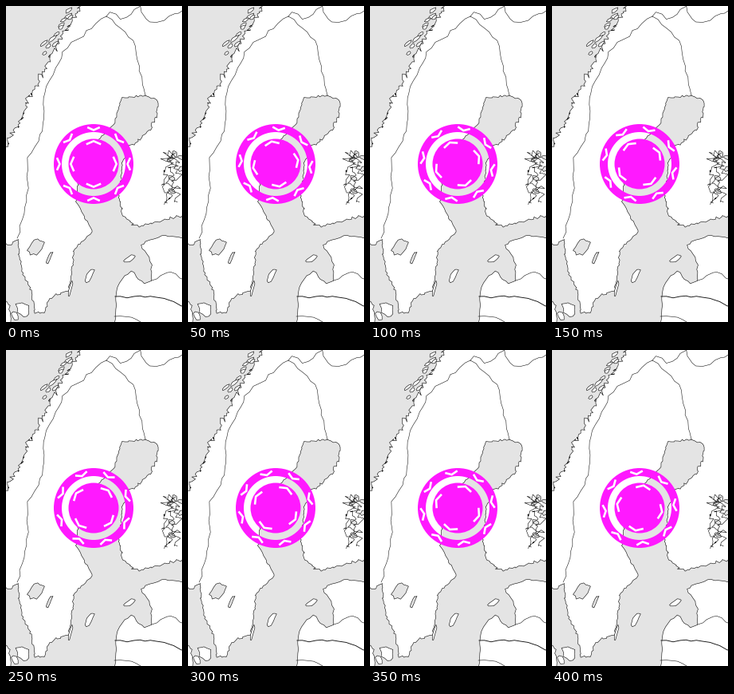
Animation, 221 px wide and 396 px high, one loop 0.45 s. Source, as a matplotlib script:

```python
import numpy as np
import matplotlib.pyplot as plt
from matplotlib.animation import FuncAnimation
from matplotlib.patches import Circle, Wedge

W, H, DPI = 221, 396, 100
FRAMES, STEP = 9, 50
PX = 72 / DPI
SEA, LAND, INK, PINK = "#e4e4e4", "#ffffff", "#101010", "#ff19ff"
CX, CY = 110, 198

rng = np.random.default_rng(7)


def rough(pts, step, amp):
    """Walk along the key points in even steps with a random wobble."""
    p = np.array(pts, float)
    dist = np.r_[0, np.cumsum(np.hypot(*np.diff(p, axis=0).T))]
    t = np.linspace(0, dist[-1], int(dist[-1] / step) + 2)
    walk = np.column_stack([np.interp(t, dist, p[:, k]) for k in (0, 1)])
    walk[1:-1] += rng.normal(0, amp, (len(t) - 2, 2))
    return walk


def stroke(pts, width=0.6):
    ax.plot(*pts.T, color=INK, lw=width * PX, zorder=2)


def border(*pts, width=0.55):
    stroke(rough(pts, 8, 0.9), width)


def land(*coasts):
    ax.fill(*np.vstack(coasts).T, fc=LAND, lw=0, zorder=1)
    for coast in coasts:
        stroke(coast)


def blob(x, y, length, width, tilt, color=LAND):
    """Ragged ellipse for an island or a lake, tilt in degrees."""
    a = np.linspace(0, 2 * np.pi, max(7, int(length / 1.6)), endpoint=False)
    r = rng.uniform(0.75, 1.2, len(a)) / 2
    u, v = length * r * np.cos(a), width * r * np.sin(a)
    c, s = np.cos(np.radians(tilt)), np.sin(np.radians(tilt))
    ax.fill(x + u * c - v * s, y + u * s + v * c, fc=color, ec=INK,
            lw=0.6 * PX, zorder=2)


fig = plt.figure(figsize=(W / DPI, H / DPI), dpi=DPI, facecolor=SEA)
ax = fig.add_axes([0, 0, 1, 1])
ax.set_xlim(0, W)
ax.set_ylim(H, 0)
ax.axis("off")

# Scandinavia and Finland
fjords = rough([(-5, 187), (17, 148), (27, 118), (42, 94), (56, 65),
                (70, 38), (84, 20), (95, -5)], 2.2, 2.1)
finland = rough([(230, 260), (195, 270), (163, 277), (147, 262), (141, 238),
                 (147, 195), (154, 177), (168, 167), (183, 152), (190, 135),
                 (190, 118), (175, 112)], 2.6, 1)
gulf = rough([(175, 112), (145, 116), (137, 146), (110, 175), (92, 212),
              (88, 245), (109, 283), (86, 304), (79, 357)], 3, 0.8)
south = rough([(79, 357), (54, 366), (48, 384), (36, 385), (32, 358),
               (20, 333), (14, 291), (6, 300), (-5, 296)], 3, 0.9)
land(fjords, np.array([(230, -5)]), finland, gulf, south)

# Estonia, Latvia and Denmark
land(rough([(230, 290), (195, 289), (168, 298), (181, 316), (183, 344),
            (172, 349), (157, 332), (140, 350), (136, 400)], 5, 0.8),
     np.array([(230, 400)]))
land(rough([(-5, 366), (5, 373), (6, 400)], 4, 1), np.array([(-5, 400)]))
blob(21, 380, 20, 15, 60)
blob(11, 388, 11, 8, 50)

# Islands
blob(155, 317, 18, 7, -25)
blob(105, 337, 19, 8, -60)
blob(81, 354, 22, 3, -75)
for t in np.linspace(0, 1, 12):
    x, y = 86 - 34 * t, 6 + 50 * t
    blob(*rng.normal((x - 5, y), 3), rng.uniform(6, 13), 4, -40)

# Lakes
blob(38, 302, 24, 15, -45, SEA)
blob(54, 316, 18, 4, -65, SEA)
for _ in range(7):
    blob(*rng.uniform((199, 185), (222, 245)), 9, 5, rng.uniform(0, 180), SEA)
for x in (200, 207, 214):
    y = np.arange(183, 250, 2.5)
    stroke(np.column_stack([x + rng.normal(0, 4, len(y)),
                            y + rng.normal(0, 2, len(y))]))

# Borders
border((14, 291), (25, 250), (27, 190), (47, 157), (47, 112), (63, 76),
       (80, 46), (96, 38), (110, 22), (126, 13))
border((126, 13), (145, 29), (163, 47), (169, 85), (175, 112))
border((126, 13), (132, 7), (147, 18), (168, 0), (176, 16), (192, 20),
       (226, 3))
border((183, 344), (202, 332), (226, 344))
border((137, 364), (187, 364), (226, 376), width=0.9)
border((136, 389), (160, 390), (175, 400))

# Rotating marker
ax.add_patch(Wedge((CX, CY), 50, 0, 360, width=10, fc=PINK, lw=0, zorder=4))
ax.add_patch(Circle((CX, CY), 31.5, fc=PINK, lw=0, zorder=4))


class Chevrons:
    def __init__(self, count, tip, end, half):
        self.shape = np.array([(-half, -end), (0, -tip), (half, -end)])
        self.count = count
        self.marks = [ax.plot([], [], color="white", lw=2.6 * PX, zorder=5,
                              solid_capstyle="butt",
                              solid_joinstyle="miter")[0]
                      for _ in range(count)]

    def turn(self, deg):
        for k, mark in enumerate(self.marks):
            a = np.radians(deg + 360 * k / self.count)
            c, s = np.cos(a), np.sin(a)
            x, y = np.array([[c, -s], [s, c]]) @ self.shape.T
            mark.set_data(CX + x, CY + y)


outer = Chevrons(8, 42.5, 46, 7.8)
inner = Chevrons(4, 28.7, 24.7, 9.2)


def update(i):
    outer.turn(45 * i / FRAMES)
    inner.turn(-90 * i / FRAMES)
    return outer.marks + inner.marks


anim = FuncAnimation(fig, update, frames=FRAMES, interval=STEP,
                     init_func=lambda: update(0), repeat=True, repeat_delay=0)
plt.show()
```
